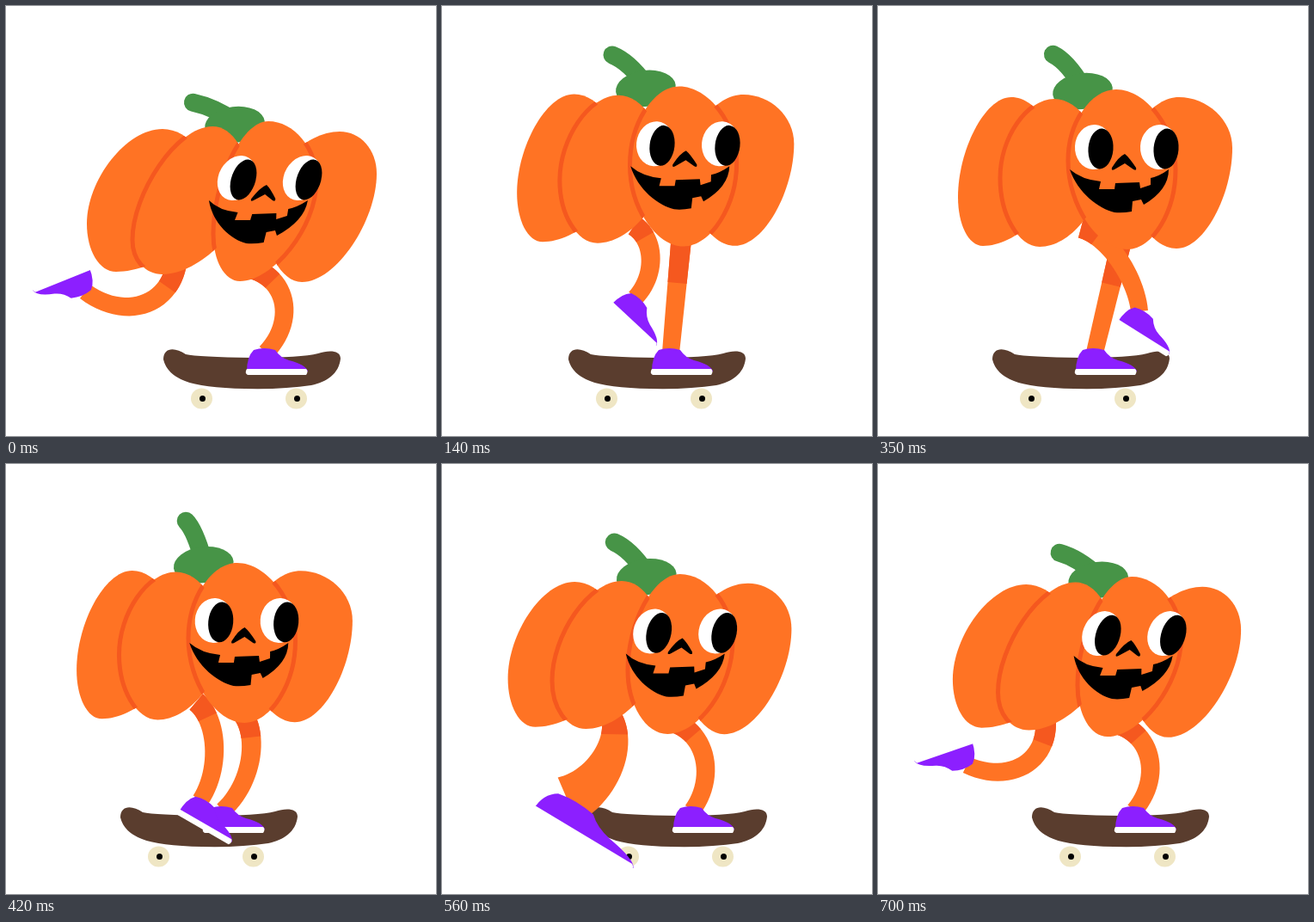
Recreate the animation shown at these times as an HTML page with a canvas. Size 500 by 500 pixels, loop 770 ms.

```html
<!DOCTYPE html>
<html lang="en">
<head>
<meta charset="utf-8">
<title>Skating pumpkin</title>
<style>
  html, body { margin: 0; width: 100%; height: 100%; overflow: hidden; background: #fff; }
  canvas { display: block; width: 500px; height: 500px; }
</style>
</head>
<body>
<canvas id="stage" width="500" height="500"></canvas>
<script>
const ctx = document.getElementById('stage').getContext('2d');
const STEP = 70, STEPS = 11;
const ORANGE = '#ff7324', SEAM = '#f5581f', GREEN = '#479447', PURPLE = '#8c1fff',
      WOOD = '#5a3d2e', CREAM = '#efe6c4', WHITE = '#fff', BLACK = '#000';

// step, body x, body y, lean, stem angle, board x, ankle x, ankle y, foot angle, knee bend, foot size
const POSES = [
  [0, 0, 37, 1, 62, 183, 92, 332, 158, 45, 1],
  [1, -16, 9, .5, 49, 158, 121, 341, 123, 50, 1],
  [3, 4, -16, -.15, 41, 136, 328, 338, -37, 0, 1],
  [5, 0, 0, 0, 39, 133, 304, 355, 32, 20, 1],
  [6, -11, 18, .1, 22, 133, 226, 391, 30, 25, 1],
  [8, -17, 31, .6, 43, 172, 146, 391, 31, 28, 1.9],
  [10, -7, 34, .9, 55, 179, 103, 350, 161, 45, 1]
];

// Body parts upright and at full lean. Lobes: top, right, bottom, left extremes.
const UPRIGHT = {
  left: [155, 106, 210, 190, 122, 279, 93, 222],
  inner: [205, 108, 260, 190, 188, 280, 142, 200],
  front: [277, 97, 346, 190, 290, 283, 221, 180],
  right: [350, 106, 412, 165, 347, 282, 290, 190],
  stem: [238, 99], nose: [287, 172], standHip: [284, 270], kickHip: [236, 258]
};
const LEANING = {
  left: [182, 106, 240, 183, 128, 272, 94, 216],
  inner: [240, 103, 282, 170, 182, 275, 147, 235],
  front: [305, 97, 361, 166, 272, 283, 241, 228],
  right: [388, 109, 431, 158, 344, 284, 300, 203],
  stem: [266, 101], nose: [303, 171], standHip: [288, 269], kickHip: [198, 263]
};

const boardShape = new Path2D('M0 411C0 397 13 396 26 405Q40 408 103 409Q160 409 180 404C192 400 206 400 206 410C204 428 190 437 172 441Q140 446 95 445Q45 444 25 436Q4 428 0 411Z');
const shoeShape = new Path2D('M1 2Q1-15 9-23Q21-27 34-23Q40-14 50-11Q70-6 72 2Z');
const soleShape = new Path2D('M1-1L70-1Q73 2 70 6L2 6Q-2 4 1-1Z');
const noseShape = new Path2D('M0 0Q5 4 13 16Q14 20 10 18L0 11L-12 18Q-16 20-15 16Q-7 3 0 0Z');
const mouthShape = new Path2D('M-64 18Q-50 30-28 32L-30 41L-12 41L-11 34L17 33L18 40L30 36L30 28Q40 26 51 18Q51 42 22 59L19 53L9 55L8 67Q-3 69-12 68C-30 64-55 45-64 18Z');

const lerp = (a, b, t) => a + (b - a) * t;
const blend = (a, b, t) => a.map((v, i) => lerp(v, b[i], t));

function poseAt(step) {
  const n = POSES.findIndex(p => p[0] >= step), b = POSES[n];
  if (b[0] === step) return b;
  const a = POSES[n - 1];
  return blend(a, b, (step - a[0]) / (b[0] - a[0]));
}

function fill(path, color) {
  ctx.fillStyle = color;
  ctx.fill(path);
}

function oval(x, y, rx, ry, color, turn = 0) {
  const p = new Path2D();
  p.ellipse(x, y, rx, ry, turn, 0, 7);
  fill(p, color);
}

function at(x, y, draw) {
  ctx.save();
  ctx.translate(x, y);
  draw();
  ctx.restore();
}

// Handle length of a leaning ellipse arc covering share u of its extent.
function handle(u) {
  const a = Math.acos(1 - 2 * u);
  return 1.25 * Math.tan(a / 4) / Math.tan(a / 2);
}

function lobePath([tx, ty, rx, ry, bx, by, lx, ly]) {
  const reach = (a, b, size) => a + (b - a) * handle(Math.abs(b - a) / size);
  const h = (a, b) => reach(a, b, rx - lx), v = (a, b) => reach(a, b, by - ty);
  const p = new Path2D();
  p.moveTo(tx, ty);
  p.bezierCurveTo(h(tx, rx), ty, rx, v(ry, ty), rx, ry);
  p.bezierCurveTo(rx, v(ry, by), h(bx, rx), by, bx, by);
  p.bezierCurveTo(h(bx, lx), by, lx, v(ly, by), lx, ly);
  p.bezierCurveTo(lx, v(ly, ty), h(tx, lx), ty, tx, ty);
  p.closePath();
  return p;
}

function seam(edge, area) {
  ctx.save();
  ctx.clip(area);
  ctx.strokeStyle = SEAM;
  ctx.lineWidth = 5;
  ctx.stroke(edge);
  ctx.restore();
}

// Tapered leg bowed sideways by "bend", from the hip up to share "end".
function legPath({ hip: [ax, ay], foot: [dx, dy], bend, w0, w1 }, end = 1, extra = 0) {
  const chord = Math.hypot(dx - ax, dy - ay);
  const nx = (dy - ay) / chord * bend, ny = (ax - dx) / chord * bend;
  const [bx, by] = [lerp(ax, dx, .2) + nx, lerp(ay, dy, .2) + ny];
  const [cx, cy] = [lerp(ax, dx, .7) + nx, lerp(ay, dy, .7) + ny];
  const one = [], two = [], n = 24;
  for (let i = 0; i <= n; i++) {
    const t = end * i / n, s = 1 - t;
    const mix = (a, b, c, d) => s * s * s * a + 3 * s * s * t * b + 3 * s * t * t * c + t * t * t * d;
    const slope = (a, b, c, d) => s * s * (b - a) + 2 * s * t * (c - b) + t * t * (d - c);
    const x = mix(ax, bx, cx, dx), y = mix(ay, by, cy, dy);
    const u = slope(ax, bx, cx, dx), v = slope(ay, by, cy, dy);
    const r = (lerp(w0, w1, t) + extra) / 2 / Math.hypot(u, v);
    one.push([x - v * r, y + u * r]);
    two.unshift([x + v * r, y - u * r]);
  }
  const p = new Path2D();
  one.concat(two).forEach(q => p.lineTo(...q));
  p.closePath();
  return p;
}

function drawLeg(leg) {
  fill(legPath(leg), ORANGE);
  fill(legPath(leg, leg.cuff), SEAM);
}

function drawShoe() {
  fill(shoeShape, PURPLE);
  fill(soleShape, WHITE);
}

function drawLegs(standHip, kickHip, boardX, ankle, angle, kickBend, size) {
  const shoeX = boardX + 96, foot = [shoeX + 23, 403];
  // The standing knee bows out as the hip sinks.
  const chord = Math.hypot(foot[0] - standHip[0], foot[1] - standHip[1]);
  const bend = .42 * Math.sqrt(Math.max(0, 134 ** 2 - chord ** 2));
  const stand = { hip: standHip, foot, bend, w0: 24, w1: 20, cuff: .45 - bend * .006 };
  const kick = { hip: kickHip, foot: ankle, bend: kickBend, w0: 24, w1: 20 + 42 * (size - 1), cuff: .21 };

  drawLeg(stand);
  ctx.globalCompositeOperation = 'source-atop';
  fill(legPath(kick, 1, 5), SEAM);
  ctx.globalCompositeOperation = 'source-over';
  at(shoeX, 423, drawShoe);
  drawLeg(kick);
  at(...ankle, () => {
    ctx.rotate(angle * Math.PI / 180);
    ctx.scale(size, .8 + .2 * size);
    ctx.translate(-16, 22);
    drawShoe();
  });
}

function drawPumpkin(body, angle) {
  const [x, y] = body.stem, a = angle * Math.PI / 180;
  const tipX = x - 55 * Math.sin(a), tipY = y - 55 * Math.cos(a);
  const stalk = new Path2D();
  stalk.moveTo(tipX, tipY);
  stalk.quadraticCurveTo(lerp(tipX, x, .5), lerp(tipY, y, .2), x, y - 4);
  ctx.strokeStyle = GREEN;
  ctx.lineWidth = 21;
  ctx.lineCap = 'round';
  ctx.stroke(stalk);
  oval(x, y, 35, 21, GREEN, -.12);

  const [left, inner, front, right] = ['left', 'inner', 'front', 'right'].map(k => lobePath(body[k]));
  fill(left, ORANGE);
  fill(right, ORANGE);
  fill(inner, ORANGE);
  seam(inner, left);
  fill(front, ORANGE);
  seam(front, inner);
  seam(front, right);
}

function drawFace(lean) {
  ctx.transform(1, 0, -.17 * lean, 1, 0, 0);
  for (const x of [-28, 48]) {
    oval(x - 8, -8, 22, 26, WHITE, .06);
    oval(x, -6, 14.5, 23.5, BLACK, .08);
  }
  fill(noseShape, BLACK);
  fill(mouthShape, BLACK);
}

function drawBoard() {
  // Goes behind everything already painted, so hubs come before wheels.
  ctx.globalCompositeOperation = 'destination-over';
  fill(boardShape, WOOD);
  for (const x of [44.5, 154.5]) {
    oval(x + 1, 456.5, 3.5, 3.5, BLACK);
    oval(x, 456.5, 12.5, 12, CREAM);
  }
  ctx.globalCompositeOperation = 'source-over';
}

function draw(step) {
  const [, x, y, lean, stemAngle, boardX, footX, footY, footAngle, bend, size] = poseAt(step);
  const body = {};
  for (const k in UPRIGHT) body[k] = blend(UPRIGHT[k], LEANING[k], lean);
  const place = ([px, py]) => [px + x, py + y];

  ctx.clearRect(0, 0, 500, 500);
  drawLegs(place(body.standHip), place(body.kickHip), boardX, [footX, footY], footAngle, bend, size);
  at(x, y, () => drawPumpkin(body, stemAngle));
  at(...place(body.nose), () => drawFace(lean));
  at(boardX, 0, drawBoard);
}

let shown = -1;
function tick() {
  const step = Math.floor(performance.now() / STEP) % STEPS;
  if (step !== shown) draw(shown = step);
  requestAnimationFrame(tick);
}
tick();
</script>
</body>
</html>
```
